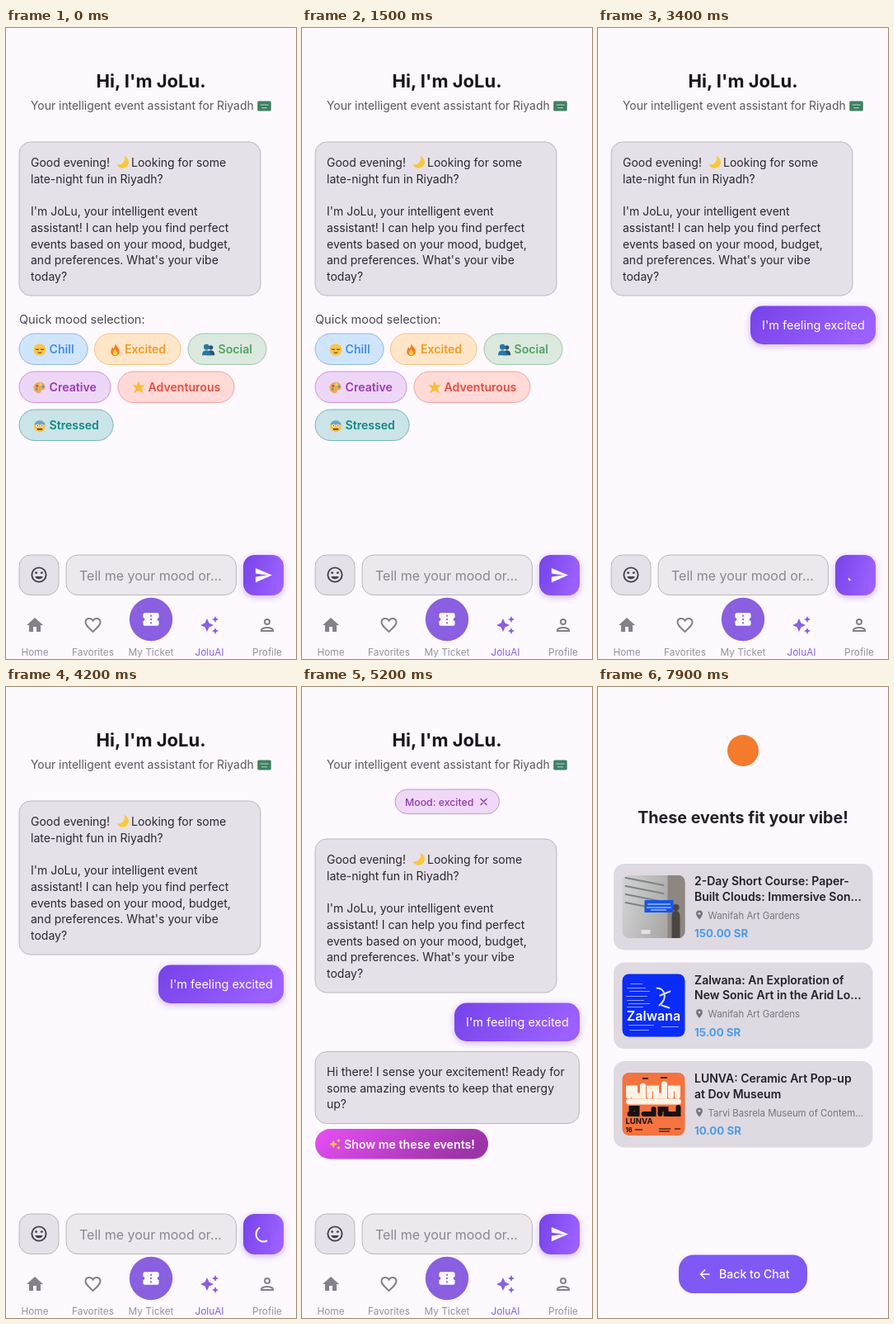
Write an HTML page that moves like this. It is 352 by 764 pixels and loops after 8000 ms.

```html
<!DOCTYPE html>
<html lang="en">
<head>
<meta charset="utf-8">
<title>Event assistant chat</title>
<style>
  html, body { margin: 0; width: 100%; height: 100%; overflow: hidden; background: #fdf9fe; }
  svg { display: block; width: 100vw; height: 100vh; }
  text { font-family: Inter, "Open Sans", sans-serif; white-space: pre; }
  .glow { filter: drop-shadow(0 2.5px 4px #8a50f066); }
</style>
</head>
<body>
<svg id="stage" viewBox="0 0 352 764"></svg>
<script>
const LOOP = 8000, SENT = 2000, REPLIED = 5200, EVENTS = 7900;
const INK = '#2b2730', GREY = '#e6e1e8', EDGE = '#bcb7bf', PURPLE = '#8a5fe0';

const text = (x, y, str, size, fill = INK, weight = 400, anchor = 'start') =>
  `<text x="${x}" y="${y}" font-size="${size}" fill="${fill}" font-weight="${weight}" text-anchor="${anchor}">${str}</text>`;
const box = (x, y, w, h, r, fill, edge = 'none', cls = '') =>
  `<rect x="${x}" y="${y}" width="${w}" height="${h}" rx="${r}" fill="${fill}" stroke="${edge}" class="${cls}"/>`;
const circle = (x, y, r, fill) => `<circle cx="${x}" cy="${y}" r="${r}" fill="${fill}"/>`;
const path = (d, fill) => `<path d="${d}" fill="${fill}"/>`;
const line = (d, color, width) =>
  `<path d="${d}" fill="none" stroke="${color}" stroke-width="${width}" stroke-linecap="round"/>`;
const group = (id, content) => `<g id="${id}">${content}</g>`;
const gradient = (id, from, to) =>
  `<linearGradient id="${id}" x2="1" y2=".25"><stop stop-color="${from}"/><stop offset="1" stop-color="${to}"/></linearGradient>`;
const paragraph = (x, rows) => rows.map(([y, str]) => text(x, y, str, 14)).join('');

// Icons live in a 24-unit box centred on (cx, cy).
const icon = (name, cx, cy, size, color) =>
  `<g transform="translate(${cx - size / 2} ${cy - size / 2}) scale(${size / 24})">${icons[name](color)}</g>`;
const icons = {
  home: c => path('M10 20v-6h4v6h5v-8h3L12 3 2 12h3v8z', c),
  heart: c => line('M12 20C6.5 15 3 12 3 8.5C3 3.5 9.5 2.3 12 6.6C14.5 2.3 21 3.5 21 8.5C21 12 17.5 15 12 20Z', c, 2),
  ticket: c => path('M22 10V6a2 2 0 0 0-2-2H4a2 2 0 0 0-2 2v4a2 2 0 0 1 0 4v4a2 2 0 0 0 2 2h16a2 2 0 0 0 2-2v-4a2 2 0 0 1 0-4z', c) +
    [6.5, 11, 15.5].map(y => box(11, y, 2, 2, 0, PURPLE)).join(''),
  sparkles: c => path('M11.5 9.5L9 4 6.5 9.5 1 12l5.5 2.5L9 20l2.5-5.5L17 12zM19 9l1.25-2.75L23 5l-2.75-1.25L19 1l-1.25 2.75L15 5l2.75 1.25zM19 15l-1.25 2.75L15 19l2.75 1.25L19 23l1.25-2.75L23 19l-2.75-1.25z', c),
  person: c => line('M12 5a3 3 0 1 1 0 6a3 3 0 1 1 0-6ZM5 19v-1c0-2 4.5-3 7-3s7 1 7 3v1Z', c, 2),
  smile: c => line('M12 3a9 9 0 1 1 0 18a9 9 0 1 1 0-18Z', c, 2) + circle(8.5, 9.5, 1.5, c) + circle(15.5, 9.5, 1.5, c) +
    path('M7 14h10a5.4 5.4 0 0 1-10 0z', c),
  send: c => path('M2 21L23 12 2 3v7l15 2-15 2z', c),
  pin: c => path('M12 2a7 7 0 0 0-7 7c0 5.25 7 13 7 13s7-7.75 7-13a7 7 0 0 0-7-7z', c) + circle(12, 9, 2.5, '#dfdae1'),
  back: c => path('M20 11H7.8l5.6-5.6L12 4l-8 8 8 8 1.4-1.4L7.8 13H20z', c),
  moon: () => path('M14 1a11 11 0 1 1-13 15a11 11 0 0 0 13-15z', '#f9c93a'),
  calm: () => circle(12, 12, 11, '#fdc544') + line('M5 11q2.5 2 5 0M14 11q2.5 2 5 0M9 17q3 2 6 0', '#6f4a1d', 1.8),
  flame: () => path('M12 0c1 6 8 8 8 15a8 8 0 0 1-16 1c0-4 2-6 3-9l2 3c2-2 3-5 3-10z', '#f57c1f') +
    path('M12 11c1 3 4 4 4 7a4 4 0 0 1-8 0c0-3 3-4 4-7z', '#ffd54a'),
  people: () => circle(16, 8, 4, '#33506f') + path('M9 22q0-9 7-9t7 9z', '#33506f') +
    circle(8, 7, 5, '#2577a8') + path('M0 22q0-9 8-9t8 9z', '#2577a8'),
  palette: () => path('M12 2C4 2 0 8 1 14c1 8 11 10 13 6 1-3 0-4 4-4 6 0 6-14-6-14z', '#e9a95c') +
    circle(7, 9, 2.2, '#e5483e') + circle(13, 6, 2.2, '#f7e04a') + circle(18, 10, 2.2, '#4a90d9') + circle(6, 15, 2.2, '#63a84e'),
  star: () => path('M12 0l3 8 9-1-7 6 4 9-9-5-9 5 4-9-7-6 9 1z', '#fbbb32'),
  anxious: () => circle(12, 13, 10.5, '#fbc445') + path('M2 10a10.5 10.5 0 0 1 20 0z', '#6aa7d6') +
    circle(8, 12, 2.4, '#fff') + circle(16, 12, 2.4, '#fff') + circle(8, 12, 1, INK) + circle(16, 12, 1, INK) + box(7, 17, 10, 3, 1, '#70471f'),
  twinkle: () => icons.sparkles('#ffc64a'),
  flag: () => box(1, 4, 22, 16, 2, '#3f8062') + line('M6 10h12M8 15h8', '#b9d5c6', 1.6),
};

const header =
  text(176, 72, 'Hi, I\'m JoLu.', 22, '#18141c', 700, 'middle') +
  text(30, 99, 'Your intelligent event assistant for Riyadh', 13.9, '#5a5660') +
  icon('flag', 313.5, 94.5, 18);

const greeting =
  box(16, 138, 293, 186, 14, GREY, EDGE) +
  paragraph(30, [
    [167.5, 'Good evening!'], [188, 'late-night fun in Riyadh?'],
    [227, 'I\'m JoLu, your intelligent event'], [247, 'assistant! I can help you find perfect'],
    [266.5, 'events based on your mood, budget,'], [286, 'and preferences. What\'s your vibe'], [305.5, 'today?'],
  ]) +
  icon('moon', 142, 162.5, 16.5) + paragraph(152, [[167.5, 'Looking for some']]);

const moods = [
  ['Chill', 'calm', 16, 370, 83, '#d0e5fc', '#8fb9e4', '#4390e0'],
  ['Excited', 'flame', 107.5, 370, 104.5, '#ffe6c8', '#f3c483', '#f39a25'],
  ['Social', 'people', 221, 370, 95, '#dbe9de', '#9fc7a9', '#52a064'],
  ['Creative', 'palette', 16, 416, 111, '#eed6f6', '#c793d6', '#9b38b2'],
  ['Adventurous', 'star', 136, 416, 141, '#ffdad7', '#f2a39d', '#e44c41'],
  ['Stressed', 'anxious', 16, 462, 114, '#cbe4e7', '#76b5b8', '#108684'],
];
const moodPicker = text(16, 357.5, 'Quick mood selection:', 14.5, '#4c4851') +
  moods.map(([name, face, x, y, w, fill, edge, ink]) =>
    box(x, y, w, 37.5, 18.75, fill, edge) + icon(face, x + 25, y + 19.5, 16) +
    text(x + 36.5, y + 24, name, 14.1, ink, 600)).join('');

const userMessage = box(185, 336.5, 152, 46.5, 15, 'url(#violet)', 'none', 'glow') +
  text(199, 365, 'I\'m feeling excited', 14.5, '#fff');

const moodTag = box(113, 124, 126.5, 29.5, 14.75, '#efd9f7', '#c594d8') +
  text(125, 143.5, 'Mood: excited', 12.3, '#9139b3', 500) +
  line('M217 135.5l7 7m0-7l-7 7', '#9139b3', 1.4);

const reply = box(16, 441.5, 320.5, 87, 14, GREY, EDGE) +
  paragraph(30, [
    [471, 'Hi there! I sense your excitement! Ready for'],
    [491, 'some amazing events to keep that energy'], [510, 'up?'],
  ]) +
  box(16, 535, 210, 36.5, 18.25, 'url(#pink)') + icon('twinkle', 40, 553.5, 15) +
  text(51, 558.5, 'Show me these events!', 14.2, '#fff', 600);

const inputBar =
  box(16, 638, 48, 48.5, 14, GREY, EDGE) + icon('smile', 40, 662, 23, '#45404a') +
  box(73, 638, 206.5, 48.5, 14, '#ece8ee', EDGE) + text(89, 668.5, 'Tell me your mood or…', 16, '#8b8791') +
  box(288, 638, 49, 49, 14, 'url(#violet)', 'none', 'glow') +
  group('sendIcon', icon('send', 312.5, 662.5, 23, '#fff')) +
  '<path id="spinner" fill="none" stroke="#fff" stroke-width="2" stroke-linecap="square"/>';

const tabs = [
  ['Home', 'home', 35], ['Favorites', 'heart', 105.5], ['My Ticket', '', 176],
  ['JoluAI', 'sparkles', 247], ['Profile', 'person', 317],
];
const navBar = circle(176, 716, 26.2, PURPLE) + icon('ticket', 176, 716, 23, '#fff') +
  tabs.map(([label, name, x]) => {
    const active = name === 'sparkles';
    return (name && icon(name, x, 723, 24, active ? PURPLE : '#85808a')) +
      text(x, 760, label, 11.8, active ? PURPLE : '#97929c', 400, 'middle');
  }).join('');

const posters = [
  box(0, 0, 76, 76, 8, 'url(#wall)') +
    [10, 20, 30, 40].map(y => line(`M4 ${y - 7}L50 ${y + 2}`, '#7f8387', 2)).join('') +
    path('M55 0h13a8 8 0 0 1 8 8v60a8 8 0 0 1-8 8h-13z', '#8d8681') +
    path('M60 76V50q0-7 5-7t5 7v26z', '#4a4442') + circle(65, 39, 4, '#4a4442') +
    box(27, 30, 35, 15, 0, '#1456e8') + line('M31 35h27M30 39h29M35 42h18', '#d7e4ff', 1) +
    box(23, 66, 11, 5, 0, '#e2e2e2'),
  box(0, 0, 76, 76, 8, '#0a2cf6') +
    line('M6 17h22M9 21h24M5 27h25M10 12h14M6 32h20M8 36h25M6 40h19M8 62h30M48 64h20M9 68h23', '#8c9fff', 1) +
    line('M42 17q7 0 9 7t-6 14M46 26l12-5M48 38l9 3', '#dce2ff', 2) +
    text(38, 56, 'Zalwana', 16, '#fff', 600, 'middle'),
  box(0, 0, 76, 76, 8, '#f5733f') +
    line('M8 28v-9h7v9h10v-12M33 28v-9h8v9h10v-14M59 28v-9h8v9', '#fff3e7', 7) +
    line('M8 35h60', '#fff3e7', 7) + line('M25 7h6M47 6h7', '#17110f', 1.5) +
    line('M9 50h9v-7h-7v6M26 50h12v-6M46 50v-6h7v6h15v-8', '#17110f', 6) +
    text(4, 62, 'LUNVA', 9.5, '#17110f', 700) + text(4, 71.5, '16', 7.5, '#17110f', 700) +
    line('M16 69h8M45 68h13M64 68h6M45 71h12', '#4d2417', 1.5),
];
const events = [
  ['2-Day Short Course: Paper-', 'Built Clouds: Immersive Son…', 'Wanifah Art Gardens', '150.00 SR'],
  ['Zalwana: An Exploration of', 'New Sonic Art in the Arid Lo…', 'Wanifah Art Gardens', '15.00 SR'],
  ['LUNVA: Ceramic Art Pop-up', 'at Dov Museum', 'Tarvi Basrela Museum of Contem…', '10.00 SR'],
];
const eventCard = ([first, second, place, price], i) =>
  `<g transform="translate(0 ${i * 119.5})">` +
  box(19, 214, 314.5, 104.5, 13, '#dfdae1') +
  `<g transform="translate(29.5 228)">${posters[i]}</g>` +
  text(117, 240, first, 14, '#231f28', 600) + text(117, 258.5, second, 14, '#231f28', 600) +
  icon('pin', 123, 276, 13.5, '#77727b') + text(133.5, 280.5, place, 11.4, '#79747d') +
  text(117, 303, price, 13.3, '#4b9ce9', 700) + '</g>';

const eventScreen =
  circle(176, 77, 19, '#f47a2c') +
  text(176, 165, 'These events fit your vibe!', 19.7, '#231f28', 700, 'middle') +
  events.map(eventCard).join('') +
  box(98, 687.5, 156, 46.5, 18, '#8058f6') + icon('back', 129.5, 711, 18, '#fff') +
  text(147, 716, 'Back to Chat', 14.1, '#fff', 500);

const stage = document.getElementById('stage');
stage.innerHTML =
  '<defs>' + gradient('violet', '#7642e8', '#9b60ff') + gradient('pink', '#ea4ff8', '#9c34a8') +
  gradient('wall', '#d3d5d6', '#a3a09d') + '</defs>' +
  group('chat', header + group('tag', moodTag) +
    group('thread', greeting + group('picker', moodPicker) + group('sent', userMessage)) +
    group('answer', reply) + inputBar + navBar) +
  group('list', eventScreen);

const el = id => document.getElementById(id);
const show = (id, visible) => el(id).setAttribute('display', visible ? 'inline' : 'none');

// Cubic ease (.4, 0, .2, 1), solved by bisection.
function ease(x) {
  x = Math.min(1, Math.max(0, x));
  const bezier = (a, b, s) => 3 * a * s * (1 - s) ** 2 + 3 * b * s * s * (1 - s) + s ** 3;
  let low = 0, high = 1;
  for (let i = 0; i < 20; i++) {
    const mid = (low + high) / 2;
    if (bezier(.4, .2, mid) < x) low = mid; else high = mid;
  }
  return bezier(0, 1, low);
}

// The arc grows, then shrinks every 1333 ms while turning every 2222 ms.
function spinnerArc(elapsed) {
  const phase = elapsed / 1333 % 1, turn = elapsed / 2222 % 1;
  const head = ease(phase * 2) * 1.5 * Math.PI, tail = ease(phase * 2 - 1) * 1.5 * Math.PI;
  const start = tail + Math.PI * (2 * turn + phase / 2 - .5);
  const sweep = Math.max(head - tail, .02);
  const point = a => `${312.5 + 9 * Math.cos(a)} ${662.5 + 9 * Math.sin(a)}`;
  return `M${point(start)}A9 9 0 ${sweep > Math.PI ? 1 : 0} 1 ${point(start + sweep)}`;
}

function draw() {
  const time = performance.now() % LOOP;
  const sent = time >= SENT, replied = time >= REPLIED, listing = time >= EVENTS;
  const loading = sent && !replied;
  show('chat', !listing);
  show('list', listing);
  show('picker', !sent);
  show('sent', sent);
  show('tag', replied);
  show('answer', replied);
  show('sendIcon', !loading);
  show('spinner', loading);
  el('thread').setAttribute('transform', `translate(0 ${replied ? 46 : 0})`);
  if (loading) el('spinner').setAttribute('d', spinnerArc(time - SENT));
  requestAnimationFrame(draw);
}
draw();
</script>
</body>
</html>
```
